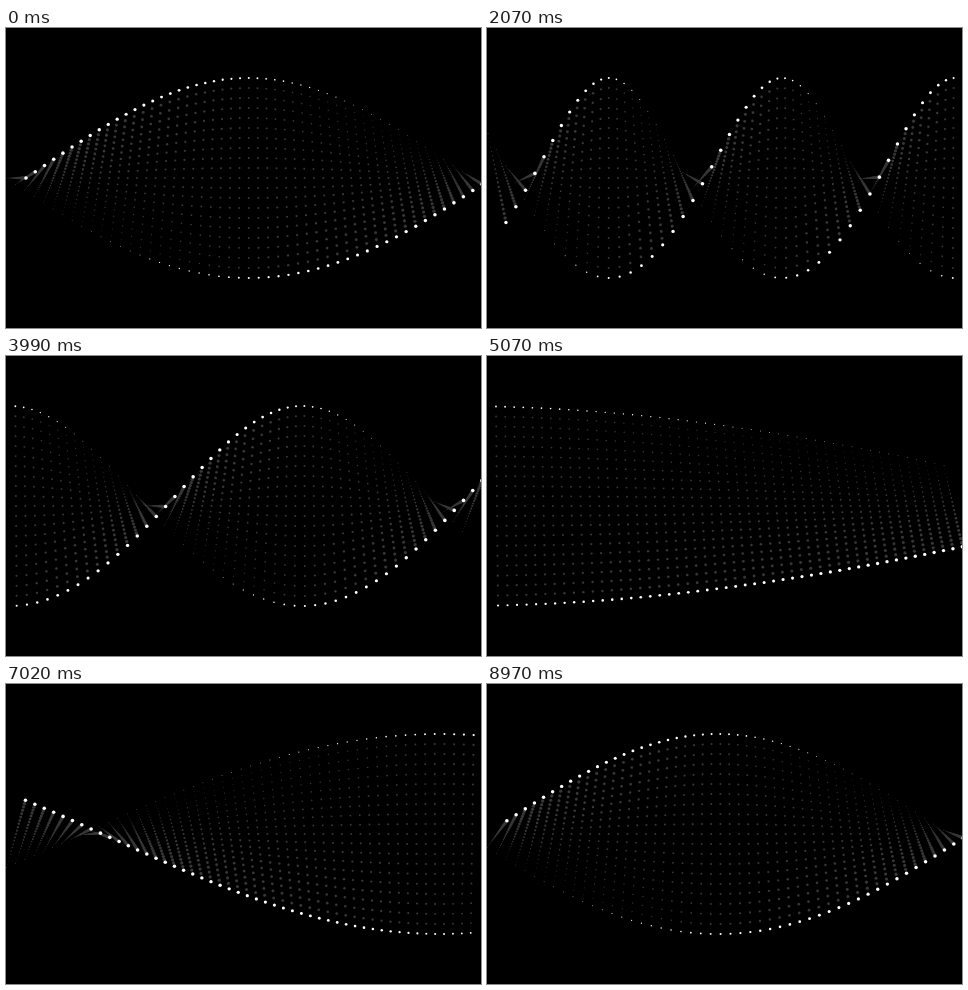
An HTML page with a canvas for the animation above (9000 ms loop, 475 px wide and 300 px high).

```html
<!DOCTYPE html>
<html lang="en">
<head>
<meta charset="utf-8">
<title>Twisting ribbon of dots</title>
<style>
  html, body { margin: 0; width: 100%; height: 100%; overflow: hidden; background: #000; }
  canvas { display: block; }
</style>
</head>
<body>
<canvas id="stage" width="475" height="300"></canvas>
<script>
const ctx = document.getElementById('stage').getContext('2d');
const TAU = 2 * Math.PI;
const LOOP = 9000, STEP = 30;
const COLUMNS = 50, HALF = 10;      // dots on each side of a column's middle
const FIRST_X = 10, GAP = 9.31, MID_Y = 150;
const DEPTH = 10, HEIGHT = 100;     // horizontal and vertical reach of a column
const SWING = 1.7 * Math.PI;

// Angle of a column around the horizontal axis
function angle(i, theta) {
  const u = i / COLUMNS;
  return Math.PI * u - theta - SWING * Math.sin(theta) * (1 - u);
}

// Place r along the column: -1 and 1 are its ends
function dot(i, a, r) {
  const z = r * Math.cos(a);
  const x = FIRST_X + i * GAP + DEPTH * z;
  const y = MID_Y - HEIGHT * r * Math.sin(a);
  ctx.beginPath();
  ctx.arc(x, y, 1 + 0.8 * z, 0, TAU);
  ctx.fill();
}

function layer(color, theta, places) {
  ctx.fillStyle = color;
  for (let i = 0; i < COLUMNS; i++) {
    const a = angle(i, theta);
    for (const r of places) dot(i, a, r);
  }
}

const inner = Array.from({ length: 2 * HALF - 1 }, (_, j) => (j + 1) / HALF - 1);
const ends = [-1, 1];

function draw() {
  const time = Math.floor(performance.now() % LOOP / STEP) * STEP;
  const theta = TAU * time / LOOP;
  ctx.fillStyle = '#000';
  ctx.fillRect(0, 0, 475, 300);
  layer('#373737', theta, inner);
  layer('#fff', theta, ends);
  requestAnimationFrame(draw);
}
draw();
</script>
</body>
</html>
```
